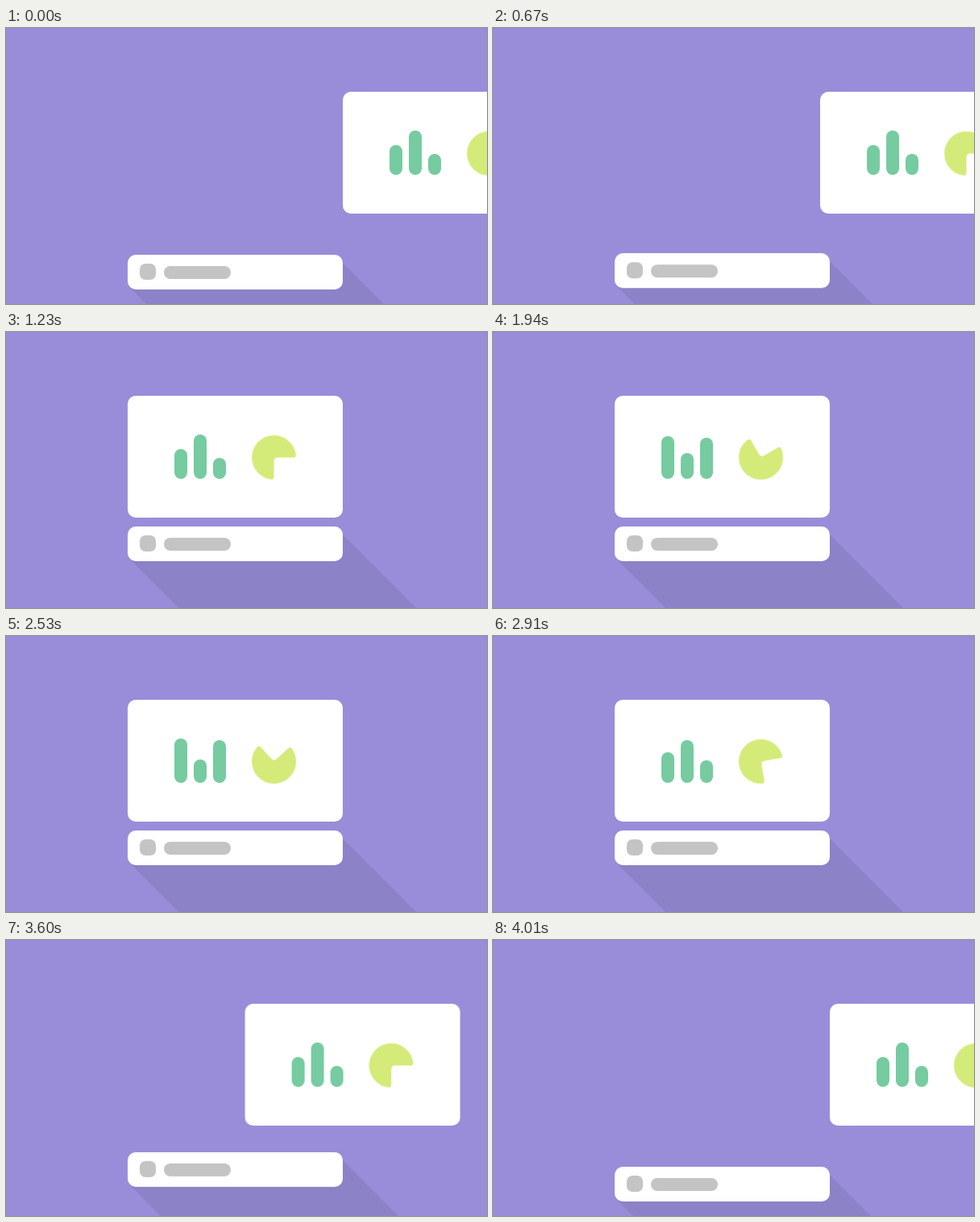
An HTML page that plays this animation: 597x342 px, repeating every 4.49 s.

```html
<!DOCTYPE html>
<html lang="en">
<head>
<meta charset="utf-8">
<title>Chart card</title>
<style>
  html, body { margin: 0; width: 100%; height: 100%; overflow: hidden; background: #998dd9; }
  .stage { position: relative; width: 597px; height: 342px; overflow: hidden; }
  .stage div, svg { position: absolute; }
  .stage div, path { animation: 4490ms ease infinite; }

  .card { left: 151px; top: 79px; width: 267px; height: 151px; border-radius: 10px; background: #fff; animation-name: slide !important; }
  .stage .bar { bottom: 48px; width: 16px; border-radius: 8px; background: #76cba0; animation-name: grow; }
  .pie { left: 154px; top: 48.5px; width: 55px; height: 55px; overflow: visible; }
  .pie path { fill: #d4eb79; animation-name: spin; }

  .panel { left: 0; top: 241px; width: 597px; height: 43px; animation-name: drop !important; }
  .shadow { left: 0; top: 0; overflow: visible; }
  .box { left: 151px; top: 0; width: 267px; height: 42.5px; border-radius: 10px; background: #fff; }
  .icon { left: 15px; top: 11px; width: 20px; height: 20px; border-radius: 7px; background: #c4c4c4; }
  .line { left: 45px; top: 13.5px; width: 83px; height: 16px; border-radius: 8px; background: #c4c4c4; }

  /* card and panel: in 634–1234 ms, out 3411–4011 ms */
  @keyframes slide {
    0%, 14.12%, 89.33%, 100% { transform: translateX(267px); }
    27.48%, 75.97% { transform: none; }
  }
  @keyframes drop {
    0%, 14.12%, 89.33%, 100% { transform: translateY(40px); }
    27.48%, 75.97% { transform: none; }
  }
  /* charts: change 1575–2175 ms, back 2512–3112 ms */
  @keyframes grow {
    0%, 35.08%, 69.31%, 100% { height: var(--from); }
    48.44%, 55.95% { height: var(--to); }
  }
  @keyframes spin {
    0%, 35.08%, 69.31%, 100% { transform: rotate(0deg); }
    48.44%, 55.95% { transform: rotate(-135deg); }
  }
</style>
</head>
<body>
<div class="stage">
  <div class="panel">
    <svg class="shadow" width="597" height="43"><polygon points="151,38 418,10 618,210 351,238" fill="#8c82c7"/></svg>
    <div class="box">
      <div class="icon"></div>
      <div class="line"></div>
    </div>
  </div>
  <div class="card">
    <div class="bar" style="left:58px; --from:37px; --to:55px"></div>
    <div class="bar" style="left:82px; --from:55px; --to:29px"></div>
    <div class="bar" style="left:106px; --from:26px; --to:54px"></div>
    <svg class="pie" viewBox="-27.5 -27.5 55 55">
      <path d="M24 0H5Q0 0 0 5V24Q0 27.5 -3.5 27.28A27.5 27.5 0 1 1 27.28 -3.5Q27.5 0 24 0Z"/>
    </svg>
  </div>
</div>
</body>
</html>
```
